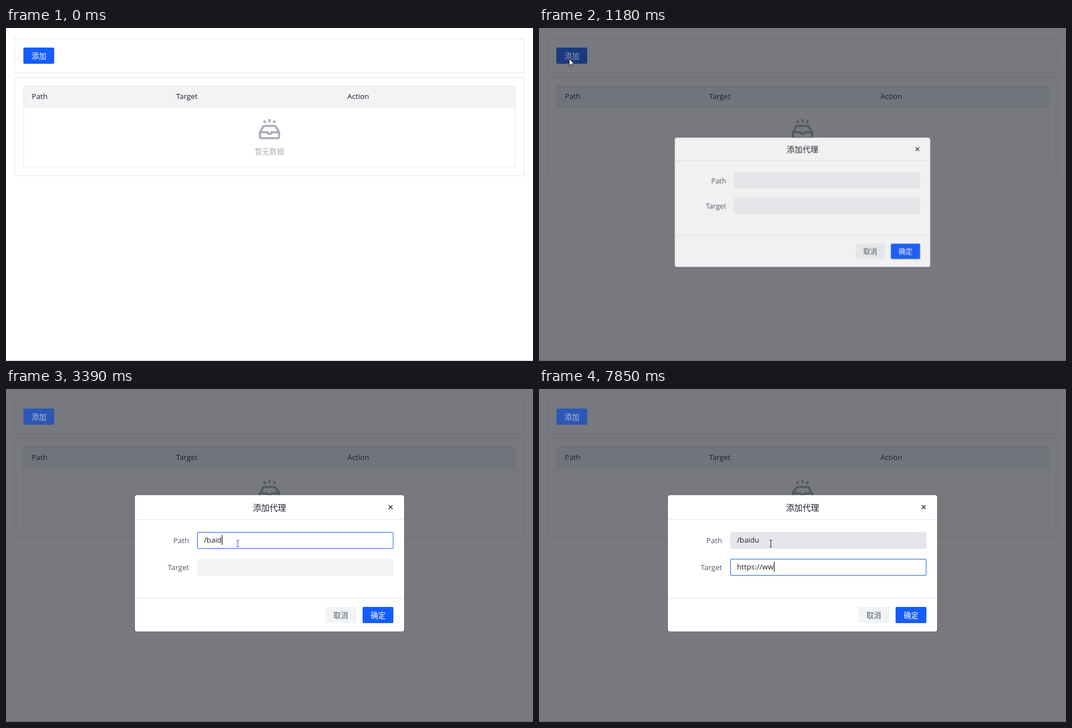
Animation, 940 px wide and 596 px high, one loop 8 s. Source, as an HTML page:

```html
<!DOCTYPE html>
<html lang="zh">
<head>
<meta charset="utf-8">
<title>添加代理</title>
<style>
html, body { margin: 0; width: 940px; height: 596px; overflow: hidden; background: #fff; }
svg { display: block; }
text { font: 13.2px "Open Sans", "Noto Sans CJK SC", "Noto Sans CJK", sans-serif; fill: #1d2129; white-space: pre; }
.mid { text-anchor: middle; }
.label { text-anchor: end; fill: #4e5969; }
.line { fill: none; stroke: #e5e6eb; }

/* 1% = 80 ms */
#add, #addText, #mask, #dialog, #path, #target, #cursor, #arrow, #beam, #click {
  animation: 8s step-end infinite;
}
#add { animation-name: add; }
#addText { animation-name: addText; }
#mask { animation-name: mask; }
#dialog { animation-name: dialog; transform-origin: 470px 312px; }
#path { animation-name: path; }
#target { animation-name: target; }
#cursor { animation-name: move; }
#arrow { animation-name: arrow; }
#beam { animation-name: beam; }
#click { animation-name: click; }

@keyframes add {
  0% { fill: #165dff; }
  12% { fill: #4080ff; }
  13% { fill: #0e42d2; }
  13.875% { fill: #1a3a80; }
  15.625%, 100% { fill: #2c57b5; }
}
@keyframes addText {
  0% { fill: #fff; }
  13.875% { fill: #9a9fb0; }
  15.625%, 100% { fill: #b4bfd9; }
}
@keyframes mask {
  0% { opacity: 0; }
  13.875%, 100% { opacity: .6; }
}
@keyframes dialog {
  0% { opacity: 0; transform: scale(.5); }
  13.875% { opacity: .5; transform: scale(.754); }
  14.75% { opacity: .9; transform: scale(.949); }
  15.625% { opacity: .98; transform: scale(.99); }
  16.5%, 100% { opacity: 1; transform: none; }
}
@keyframes path {
  0% { fill: #f2f3f5; stroke: #f2f3f5; }
  19.125% { fill: #e5e6eb; stroke: #e5e6eb; }
  22.625% { fill: #fff; stroke: #165dff; }
  47.375% { fill: #f2f3f6; stroke: #a0bbf5; }
  48.25%, 100% { fill: #e5e6eb; stroke: #e5e6eb; }
}
@keyframes target {
  0% { fill: #f2f3f5; stroke: #f2f3f5; }
  47.375% { fill: #f9f9fa; stroke: #a0bbf5; }
  48.25%, 100% { fill: #fff; stroke: #165dff; }
}
@keyframes move {
  0% { transform: translate(812px, 520px); opacity: 0; }
  3.25% { transform: translate(812px, 520px); opacity: 1; animation-timing-function: steps(4); }
  6.75% { transform: translate(300px, 215px); opacity: 1; animation-timing-function: steps(4); }
  10.25% { transform: translate(75px, 72px); opacity: 1; animation-timing-function: steps(2); }
  12% { transform: translate(56px, 58px); opacity: 1; }
  13% { transform: translate(54px, 55px); opacity: 1; }
  14.75% { transform: translate(54px, 55px); opacity: 1; animation-timing-function: steps(4); }
  18.25% { transform: translate(378px, 246px); opacity: 1; }
  19.125% { transform: translate(402px, 267px); opacity: 1; }
  20% { transform: translate(411px, 274px); opacity: 1; }
  20.875%, 100% { transform: translate(413px, 276px); opacity: 1; }
}
@keyframes arrow {
  0% { opacity: 1; }
  19.125%, 100% { opacity: 0; }
}
@keyframes beam {
  0% { opacity: 0; stroke: #222; }
  19.125% { opacity: 1; stroke: #222; }
  22.625% { opacity: 1; stroke: #2b5a9e; }
  48.25%, 100% { opacity: 1; stroke: #222; }
}
@keyframes click {
  0% { opacity: 0; }
  13% { opacity: .5; }
  13.875% { opacity: 0; }
  21.75% { opacity: .5; }
  22.625%, 100% { opacity: 0; }
}
</style>
</head>
<body>
<svg width="940" height="596" viewBox="0 0 940 596">
  <rect class="line" x="15.5" y="19.5" width="909" height="61"/>
  <rect class="line" x="15.5" y="88.5" width="909" height="176"/>
  <path d="M31 141V107a4 4 0 0 1 4-4H905a4 4 0 0 1 4 4V141Z" fill="#f2f3f5"/>
  <path class="line" d="M31.5 248.5V107.5a4 4 0 0 1 4-4H904.5a4 4 0 0 1 4 4V248.5ZM31 141.5H909"/>
  <text x="46" y="127">Path</text>
  <text x="303.5" y="127">Target</text>
  <text x="609" y="127">Action</text>
  <path transform="translate(447.2 158.2) scale(.95)" fill="none" stroke="#a9aeb8" stroke-width="4"
    d="M24 5v6m7 1 4-4m-18 4-4-4m28.5 22H28s-1 3-4 3-4-3-4-3H6.5M40 41H8a2 2 0 0 1-2-2v-8.5a2 2 0 0 1 .3-1l6.1-10.5a2 2 0 0 1 1.7-1h19.8a2 2 0 0 1 1.7 1l6.1 10.5a2 2 0 0 1 .3 1V39a2 2 0 0 1-2 2Z"/>
  <text class="mid" x="470" y="226" style="fill:#a9aeb8">暂无数据</text>
  <path d="M0 595.5H940" stroke="#c2c2c6"/>

  <rect id="mask" width="940" height="596" fill="#1d2129"/>
  <rect id="add" x="31" y="35" width="55" height="29" rx="2"/>
  <text id="addText" class="mid" x="58.7" y="54.5">添加</text>

  <g id="dialog">
    <rect x="230" y="190" width="480" height="244" rx="4" fill="#fff"/>
    <path class="line" d="M230 233.5H710M230 374.5H710"/>
    <text class="mid" x="470" y="217.5" style="font-size:14.8px">添加代理</text>
    <path d="M682.5 208l7 7m0-7l-7 7" stroke="#1d2129" stroke-width="1.3"/>
    <text class="label" x="326.5" y="276">Path</text>
    <text class="label" x="326.5" y="324">Target</text>
    <rect id="path" x="341.5" y="256.5" width="349" height="29" rx="1.5"/>
    <rect id="target" x="341.5" y="304.5" width="349" height="29" rx="1.5"/>
    <text id="pathText" x="353" y="275"></text>
    <text id="targetText" x="353" y="323"></text>
    <rect id="caret" width="1" height="18"/>
    <rect x="570" y="390" width="55" height="29" rx="2" fill="#f2f3f5"/>
    <text class="mid" x="597.3" y="409.5" style="fill:#4e5969">取消</text>
    <rect x="636" y="390" width="55" height="29" rx="2" fill="#165dff"/>
    <text class="mid" x="663.7" y="409.5" style="fill:#fff">确定</text>
  </g>

  <g id="cursor">
    <path id="arrow" d="M0 0V12.2L2.8 9.6 4.7 14 6.6 13.2 4.7 8.9H8.6Z" fill="#fff" stroke="#111" stroke-width=".9"/>
    <path id="beam" d="M-2 -5.5H0M1 -5.5H3M.5 -5V6M-2 6.5H0M1 6.5H3" fill="none"/>
    <circle id="click" r="11" fill="#ff0"/>
  </g>
</svg>
<script>
const $ = id => document.getElementById(id);
const LOOP = 8000, BLINK = 530;
const fields = [
  { node: $('pathText'), text: '/baidu', y: 261, focus: 1810, blur: 3790,
    keys: [2600, 2860, 3060, 3190, 3260, 3390] },
  { node: $('targetText'), text: 'https://www', y: 309, focus: 3790, blur: LOOP,
    keys: [4450, 4520, 4720, 4920, 5580, 6310, 6990, 7190, 7520, 7720, 7850] }
];
const caret = $('caret');
const clock = $('dialog').getAnimations()[0];

function draw() {
  // Typing follows the clock of the CSS animations.
  const t = (clock.currentTime || 0) % LOOP;
  let shown = false;
  for (const f of fields) {
    const count = f.keys.filter(k => k <= t).length;
    f.node.textContent = f.text.slice(0, count);
    if (t < f.focus || t >= f.blur) continue;
    const last = count ? f.keys[count - 1] : f.focus;
    shown = (t - last) % (2 * BLINK) < BLINK;
    const width = count ? f.node.getComputedTextLength() : 0;
    caret.setAttribute('x', Math.round(353 + width));
    caret.setAttribute('y', f.y);
  }
  caret.style.opacity = shown ? 1 : 0;
  requestAnimationFrame(draw);
}
draw();
</script>
</body>
</html>
```
